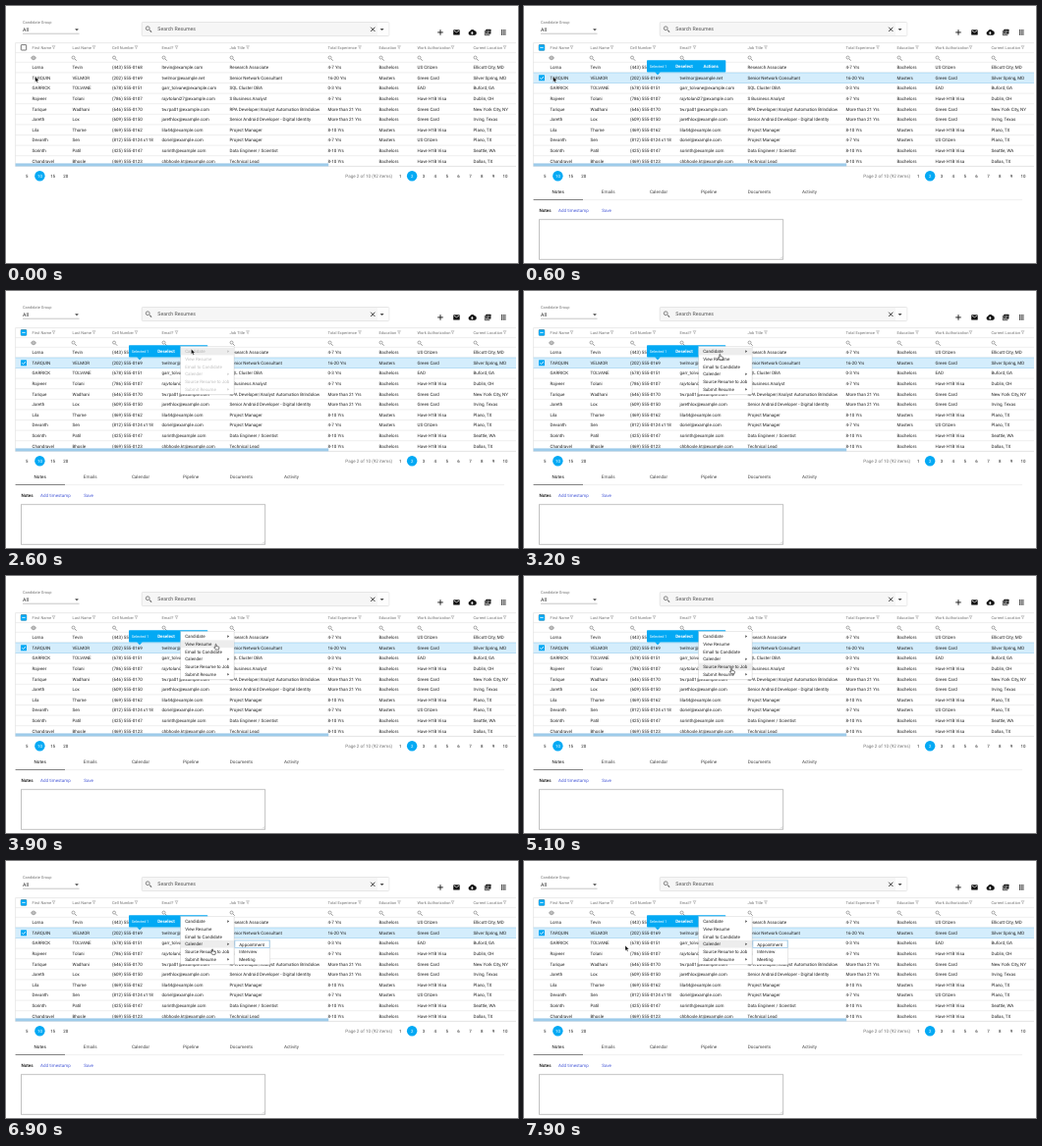
Recreate the animation shown at these times as an HTML page. Size 521 px wide and 262 px high, loop 8000 ms.

```html
<!DOCTYPE html>
<html lang="en">
<head>
<meta charset="utf-8">
<title>Resume list</title>
<style>
html, body { margin: 0; width: 100%; height: 100%; overflow: hidden; background: #fff; }
svg { display: block; width: 521px; height: 262px; }
text { font-family: Roboto, Arial, sans-serif; text-rendering: geometricPrecision; white-space: pre; }
</style>
</head>
<body>
<svg id="stage" viewBox="0 0 521 262"></svg>
<script>
const stage = document.getElementById('stage');
const LOOP = 8000, STEP = 100;
const INK = '#222', GRAY = '#757575', BLUE = '#03a9f4', LINE = '#dcdcdc';

function add(parent, tag, attrs, content) {
  const el = document.createElementNS('http://www.w3.org/2000/svg', tag);
  for (const key in attrs) el.setAttribute(key, attrs[key]);
  if (content !== undefined) el.textContent = content;
  parent.appendChild(el);
  return el;
}
const group = (parent, attrs = {}) => add(parent, 'g', attrs);
const path = (parent, d, attrs) => add(parent, 'path', { d, fill: 'none', ...attrs });
const rect = (parent, x, y, width, height, fill, attrs) =>
  add(parent, 'rect', { x, y, width, height, fill, ...attrs });
// y is the vertical middle of the capitals
const label = (parent, x, y, str, size = 4.5, fill = INK, attrs = {}) =>
  add(parent, 'text', { x, y: y + size * 0.355, 'font-size': size, fill, ...attrs }, str);
const hline = (parent, x1, x2, y, stroke = LINE, width = 0.5) =>
  path(parent, `M${x1} ${y}H${x2}`, { stroke, 'stroke-width': width });
const centered = { 'text-anchor': 'middle' };

function magnifier(parent, x, y, r = 1.5, color = GRAY) {
  add(parent, 'circle', { cx: x - r * 0.3, cy: y - r * 0.3, r, fill: 'none', stroke: color, 'stroke-width': r * 0.42 });
  path(parent, `M${x + r * 0.75} ${y + r * 0.75}l${r} ${r}`, { stroke: color, 'stroke-width': r * 0.55 });
}
const caret = (parent, x, y, w = 2) =>
  path(parent, `M${x - w} ${y - w / 2}h${2 * w}l${-w} ${w}z`, { fill: '#444' });

const rowY = i => 62.6 + i * 10.6;
const columns = [
  { x: 26.5, title: 'First Name', funnel: 48.5, search: 28, cells: ['Lorna', 'TARQUIN', 'GARRICK', 'Rajveer', 'Tarique', 'Jareth', 'Lila', 'Devanth', 'Sorinth', 'Chandravel'] },
  { x: 67.5, title: 'Last Name', funnel: 89.5, search: 69, cells: ['Tevin', 'VELMOR', 'TOLVANE', 'Tolani', 'Wadhani', 'Lox', 'Thorne', 'Sen', 'Patil', 'Bhosle'] },
  { x: 108, title: 'Cell Number', funnel: 132.5, search: 110.5, cells: ['(443) 555-0168', '(202) 555-0169', '(678) 555-0151', '(786) 555-0107', '(646) 555-0170', '(609) 555-0150', '(469) 555-0162', '(812) 555-0124 x118', '(425) 555-0147', '(469) 555-0123'] },
  { x: 158.5, title: 'Email?', funnel: 173.5, search: 161, cells: ['ltevin@example.com', 'tvelmor@example.net', 'garr_tolvane@example.com', 'rajvtolani27@example.com', 'tw.rpa01@example.com', 'jarethlox@example.com', 'lila44@example.com', 'doriel@example.com', 'sorinth@example.com', 'chbhosle.kt@example.com'] },
  { x: 227.5, title: 'Job Title', funnel: 246, search: 230, cells: ['Research Associate', 'Senior Network Consultant', 'SQL Cluster DBA', 'S Business Analyst', 'RPA Developer/Analyst Automation Brindolow', 'Senior Android Developer - Digital Identity', 'Project Manager', 'Project Manager', 'Data Engineer / Scientist', 'Technical Lead'] },
  { x: 327.5, title: 'Total Experience', funnel: 360, search: 330, cells: ['4-7 Yrs', '16-20 Yrs', '0-3 Yrs', '4-7 Yrs', 'More than 21 Yrs', 'More than 21 Yrs', '8-10 Yrs', '4-7 Yrs', '8-10 Yrs', '8-10 Yrs'] },
  { x: 379.5, title: 'Education', funnel: 400, search: 382, cells: ['Bachelors', 'Masters', 'Bachelors', 'Bachelors', 'Bachelors', 'Bachelors', 'Masters', 'Masters', 'Bachelors', 'Bachelors'] },
  { x: 418.5, title: 'Work Authorization', funnel: 454.5, search: 421, cells: ['US Citizen', 'Green Card', 'EAD', 'Have H1B Visa', 'Green Card', 'Green Card', 'Have H1B Visa', 'US Citizen', 'Have H1B Visa', 'Have H1B Visa'] },
  { x: 475.5, title: 'Current Location', funnel: 507.5, search: 478, cells: ['Ellicott City, MD', 'Silver Spring, MD', 'Buford, GA', 'Dublin, OH', 'New York City, NY', 'Irving, Texas', 'Plano, TX', 'Plano, TX', 'Seattle, WA', 'Dallas, TX'] }
];

function drawToolbar() {
  label(stage, 17, 16.5, 'Candidate Group', 3.95, GRAY);
  label(stage, 17, 24, 'All', 5.2);
  caret(stage, 72, 24.2, 1.9);
  hline(stage, 17, 74.5, 28.2, '#8a8a8a');

  rect(stage, 138.2, 16.5, 251.6, 14, '#f6f6f6', { stroke: '#d8d8d8', 'stroke-width': 0.6, rx: 1 });
  magnifier(stage, 144.8, 23.3, 1.9, '#666');
  label(stage, 154.3, 23.4, 'Search Resumes', 5.2, '#555');
  path(stage, 'M371.2 21.7l4.2 4.2m0 -4.2l-4.2 4.2', { stroke: '#222', 'stroke-width': 0.9 });
  rect(stage, 378, 17, 11.4, 13, '#fdfdfd');
  caret(stage, 382.6, 24, 2);

  const icons = group(stage, { fill: '#111' });
  path(icons, 'M442 24.1v5.6m-2.8 -2.8h5.6', { stroke: '#111', 'stroke-width': 0.9 });
  rect(icons, 455.2, 24.2, 6.5, 5.2, '#111', { rx: 0.5 });
  path(icons, 'M455.7 25l2.75 1.8l2.75 -1.8', { stroke: '#fff', 'stroke-width': 0.7 });
  path(icons, 'M472.4 29.7a1.95 1.95 0 0 1 -.3 -3.85a2.6 2.6 0 0 1 4.7 -.5a2.2 2.2 0 0 1 .2 4.35z', { fill: '#111' });
  path(icons, 'M473.7 26.2h1.2v1.3h1l-1.6 1.6l-1.6 -1.6h1z', { fill: '#fff' });
  rect(icons, 488.2, 23.8, 5.2, 4.8, '#111', { rx: 0.4 });
  path(icons, 'M487.3 25v4.7h5', { stroke: '#111', 'stroke-width': 0.7 });
  path(icons, 'M489.2 25.3h3.2m-3.2 1.1h3.2m-3.2 1.1h2', { stroke: '#fff', 'stroke-width': 0.45 });
  for (let i = 0; i < 9; i++)
    rect(icons, 504 + (i % 3) * 1.7, 24.1 + Math.floor(i / 3) * 2, 1.1, 1.5, '#222');
}

function drawTable() {
  path(stage, 'M519 37.6H9.6V163.6H519', { stroke: LINE, 'stroke-width': 0.6 });
  hline(stage, 9.6, 519, 47.6);
  for (let i = 0; i <= 10; i++) hline(stage, 9.6, 519, 57.3 + i * 10.6);
  rect(stage, 15.3, 39.6, 5.4, 5.4, '#fff', { stroke: '#555', 'stroke-width': 0.8, rx: 0.5 });

  const selection = group(stage);
  rect(selection, 9.6, 68, 509.4, 10.6, '#d4edfc');
  hline(selection, 9.6, 519, 68.1, '#8fcdf0');
  hline(selection, 9.6, 519, 78.5, '#8fcdf0');
  for (const y of [39.4, 70.3])
    rect(selection, 15, y, 6, 6, BLUE, { rx: 0.6 });
  path(selection, 'M16.3 42.4h3.4', { stroke: '#fff', 'stroke-width': 0.8 });
  path(selection, 'M16.3 73.3l1.2 1.2l2.4 -2.5', { stroke: '#fff', 'stroke-width': 0.8 });

  columns.forEach((col, n) => {
    label(stage, col.x, 42.2, col.title, 4, GRAY);
    path(stage, `M${col.funnel - 1.5} 40.7h3l-1.2 1.5v1.5l-.6 -.4v-1.1z`, { stroke: '#8a8a8a', 'stroke-width': 0.4 });
    if (n) magnifier(stage, col.search, 53);
    col.cells.forEach((cell, i) => label(stage, col.x, rowY(i), cell));
  });
  add(stage, 'circle', { cx: 28, cy: 52.9, r: 1.9, fill: 'none', stroke: GRAY, 'stroke-width': 0.6 });
  path(stage, 'M25 52.9h6m-4 -.9h2m-2 1.8h2', { stroke: GRAY, 'stroke-width': 0.5 });
  rect(stage, 9.6, 160.4, 318.6, 3, '#9dcbea');
  return selection;
}

function drawPager() {
  const number = (x, n, active) => {
    if (active) add(stage, 'circle', { cx: x, cy: 173.2, r: 5.2, fill: BLUE });
    label(stage, x, 173.3, n, 4.4, active ? '#fff' : INK, centered);
  };
  [5, 10, 15, 20].forEach((n, i) => number(21.2 + i * 13.2, n, n === 10));
  label(stage, 345.3, 173.2, 'Page 2 of 10 (92 items)', 4.6, GRAY);
  for (let n = 1; n <= 10; n++) number(401.3 + (n - 1) * 11.85, n, n === 2);
}

function drawNotes() {
  const g = group(stage);
  const tabs = [['Notes', 34.7], ['Emails', 85.7], ['Calendar', 137], ['Pipeline', 188], ['Documents', 239.5], ['Activity', 290.5]];
  tabs.forEach(([name, x], i) => label(g, x, 189.7, name, 4.6, i ? '#444' : '#111', centered));
  hline(g, 9.6, 507, 197.6, '#e0e0e0');
  hline(g, 9.6, 60, 197.5, '#555', 0.7);
  label(g, 15.4, 208.8, 'Notes', 4.6, '#111', { 'font-weight': 500 });
  label(g, 35, 208.8, 'Add timestamp', 4.5, '#4456d6');
  label(g, 79.3, 208.8, 'Save', 4.5, '#4456d6');
  rect(g, 15.5, 217.8, 248.3, 40.4, '#fff', { stroke: '#999', 'stroke-width': 0.6 });
  path(g, 'M261 257.4l2 -2m-.9 2l.9 -.9', { stroke: '#888', 'stroke-width': 0.3 });
  return g;
}

function drawPopover() {
  const g = group(stage);
  rect(g, 125, 55.2, 80.3, 12.3, BLUE, { rx: 0.8 });
  path(g, 'M133.2 67.3h5.6l-2.8 3z', { fill: BLUE });
  label(g, 127.8, 61.4, 'Selected 1', 3.8, '#fff');
  label(g, 154.2, 61.2, 'Deselect', 4.5, '#fff', { 'font-weight': 700 });
  label(g, 182.4, 61.2, 'Actions', 4.5, '#fff', { 'font-weight': 700 });
  return g;
}

// An item ending in ">" opens a further menu.
function drawMenu(x, y, width, items, textX, focusFirst) {
  const g = group(stage);
  const height = items.length * 7.72 + 2.4;
  rect(g, x - 0.5, y, width + 1, height + 1, '#000', { opacity: 0.09, rx: 1 });
  rect(g, x, y, width, height, '#fff', { stroke: '#d5d5d5', 'stroke-width': 0.4 });
  const hover = rect(g, x, y, width, 7.7, '#ededed', { visibility: 'hidden' });
  const content = group(g);
  if (focusFirst)
    rect(g, x + 0.5, y + 1, width - 1, 7.5, 'none', { stroke: '#79b8e6', 'stroke-width': 0.6 });
  items.forEach((item, i) => {
    const cy = y + 5.1 + i * 7.72;
    label(content, textX, cy, item.replace('>', ''));
    if (item.endsWith('>'))
      path(content, `M${x + width - 6.6} ${cy - 1.3}l1.6 1.3l-1.6 1.3z`, { fill: '#333' });
  });
  return { g, hover, content, y };
}

function drawCursors() {
  const g = group(stage);
  const arrow = path(g, 'M0 0v5.2l1.2 -1.1l.9 1.9l.9 -.4l-.9 -1.9h1.7z',
    { fill: '#000', stroke: '#fff', 'stroke-width': 0.35 });
  const hand = path(g, 'M-.5 .4q.5 -.8 1 0v1.9l2.3 .6q.6 .2 .5 .9l-.4 1.9h-3.1l-1.7 -2.2q.3 -.7 1.4 0z',
    { fill: '#fff', stroke: '#111', 'stroke-width': 0.55 });
  return { g, arrow, hand };
}

drawToolbar();
const selection = drawTable();
drawPager();
const notes = drawNotes();
const popover = drawPopover();
const menu = drawMenu(177.8, 56.5, 54.2,
  ['Candidate>', 'View Resume', 'Email to Candidate', 'Calender>', 'Source Resume to Job', 'Submit Resume>'], 182.2);
const submitMenu = drawMenu(232.4, 95.3, 35.6, ['Contact>', 'To a Job>'], 237.2, true);
const calendarMenu = drawMenu(232.4, 80, 36.2, ['Appointment', 'Interview', 'Meeting'], 237.2, true);
const cursor = drawCursors();

const track = [
  [0, 29.7, 72.3], [700, 29.7, 72.3], [1300, 31.2, 82.3], [1600, 32, 82.3],
  [2500, 188.5, 59.2], [2600, 188.5, 59.2], [3400, 203, 66], [3900, 213.6, 69.3],
  [4100, 213.6, 69.3], [5000, 211.2, 94], [5300, 211.2, 94], [6000, 211.8, 99],
  [6400, 211.8, 99], [7200, 209, 84], [7500, 209, 84], [7900, 103, 86.2]
];

function cursorAt(t) {
  const i = track.findIndex(k => k[0] > t);
  if (i < 0) return track[track.length - 1].slice(1);
  const [a, b] = [track[i - 1], track[i]];
  const p = (t - a[0]) / (b[0] - a[0]);
  return [a[1] + (b[1] - a[1]) * p, a[2] + (b[2] - a[2]) * p];
}

const show = (el, on) => el.setAttribute('visibility', on ? 'visible' : 'hidden');
const display = (el, on) => el.setAttribute('display', on ? 'inline' : 'none');

function render(time) {
  const t = Math.floor((time % LOOP) / STEP) * STEP;
  const [x, y] = cursorAt(t);
  for (const el of [selection, notes, popover]) display(el, t >= 400);

  display(menu.g, t >= 2600);
  menu.content.setAttribute('opacity', Math.min(1, 0.28 + Math.max(0, t - 2600) / 250));
  const calendarOpen = t >= 6900;
  const item = calendarOpen ? 3 : Math.max(0, Math.min(5, Math.floor((y - menu.y - 1.2) / 7.72)));
  menu.hover.setAttribute('y', menu.y + 1.2 + item * 7.72);
  show(menu.hover, t >= 2600);
  display(submitMenu.g, t >= 5600 && !calendarOpen);
  display(calendarMenu.g, calendarOpen);

  const onMenu = t >= 2700 && t < 7600;
  display(cursor.hand, onMenu);
  display(cursor.arrow, !onMenu);
  cursor.g.setAttribute('transform', `translate(${x} ${y})`);
}

const start = performance.now();
function tick() {
  render(performance.now() - start);
  requestAnimationFrame(tick);
}
tick();
</script>
</body>
</html>
```
